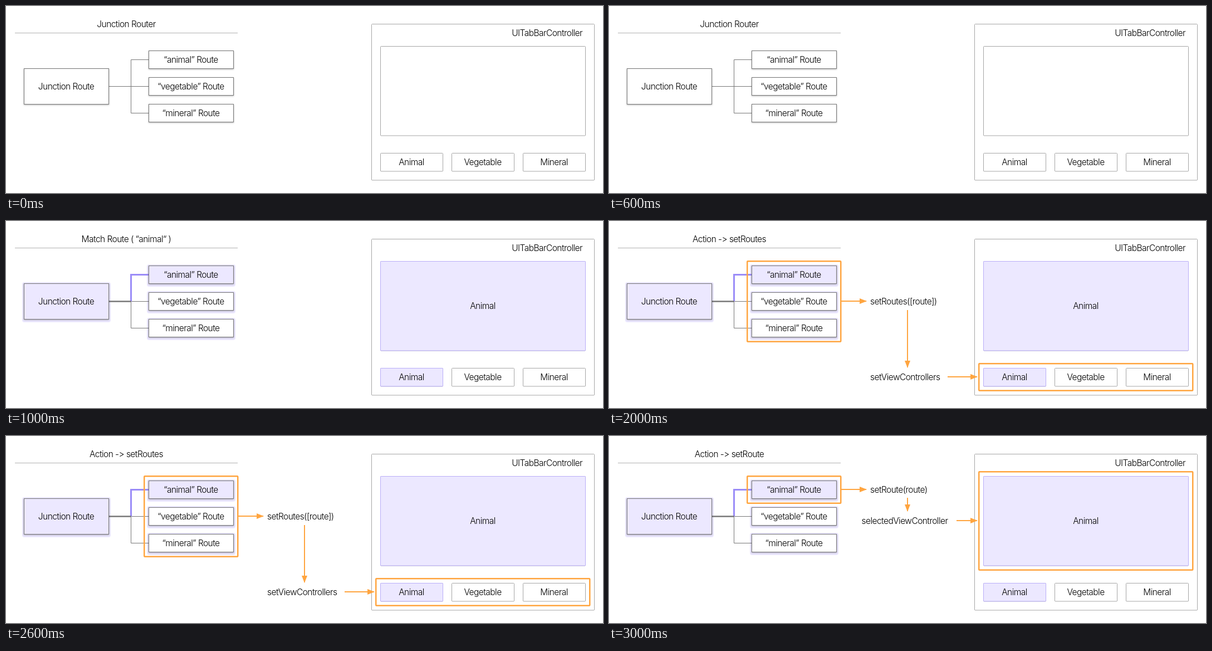
Write an HTML page that moves like this. It is 1072x336 px and loops after 4000 ms.

```html
<!DOCTYPE html>
<html lang="en">
<head>
<meta charset="utf-8">
<title>Tab routing</title>
<style>
  html, body { margin: 0; width: 100%; height: 100%; overflow: hidden; background: #fff; }
  svg { display: block; width: 1072px; height: 336px; }
  text { font: 300 15.5px Inter, Roboto, sans-serif; letter-spacing: -.55px; fill: #000; }
  .mid { text-anchor: middle; }
  .end { text-anchor: end; }
  .line { fill: none; stroke: #777; }
  .rule { fill: none; stroke: #b0b0b0; }
  .node { fill: #fff; stroke: #777; }
  .view { fill: #fff; stroke: #a6a6a6; }
  .halo { fill: #ece8ff; }
  .on { fill: #ece8ff; }
  .view.on { stroke: #b9aef8; }
  .path { fill: none; stroke: #9b8cf8; stroke-width: 3; }
  .mark { fill: none; stroke: #ffa540; stroke-width: 2.5; stroke-linejoin: round; }
  .arrow { fill: none; stroke: #ffa540; stroke-width: 2; marker-end: url(#head); }
  .shadow { filter: drop-shadow(0 1.5px 1.5px rgba(0, 0, 0, .3)); }

  .idle, .match, .routes, .route, .lit { animation: 4s step-end infinite; }
  .idle { animation-name: idle; }
  .match { animation-name: match; }
  .routes { animation-name: routes; }
  .route { animation-name: route; }
  .lit { animation-name: lit; }
  @keyframes idle { 0% { opacity: 1 } 25%, 100% { opacity: 0 } }
  @keyframes match { 0% { opacity: 0 } 25% { opacity: 1 } 50%, 100% { opacity: 0 } }
  @keyframes routes { 0% { opacity: 0 } 50% { opacity: 1 } 75%, 100% { opacity: 0 } }
  @keyframes route { 0% { opacity: 0 } 75%, 100% { opacity: 1 } }
  @keyframes lit { 0% { opacity: 0 } 25%, 100% { opacity: 1 } }
</style>
</head>
<body>
<svg viewBox="0 0 1072 336">
  <defs>
    <marker id="head" markerUnits="userSpaceOnUse" markerWidth="13" markerHeight="10" refX="12" refY="5" orient="auto">
      <path d="M0 0L13 5L0 10Z" fill="#ffa540"/>
    </marker>
  </defs>

  <!-- titles -->
  <path class="rule" d="M16 48.5H416"/>
  <text class="mid idle" x="216" y="38">Junction Router</text>
  <text class="mid match" x="216" y="38">Match Route ( “animal“ )</text>
  <text class="mid routes" x="216" y="38">Action -&gt; setRoutes</text>
  <text class="mid route" x="216" y="38">Action -&gt; setRoute</text>

  <!-- route tree -->
  <g class="halo lit">
    <rect x="29" y="110" width="159" height="72" rx="4"/>
    <rect x="253" y="78" width="159" height="40" rx="4"/>
    <rect x="253" y="126" width="159" height="40" rx="4"/>
    <rect x="253" y="174" width="159" height="40" rx="4"/>
  </g>
  <path class="line" d="M185 144.5H256M256 96.5H224.5V192.5H256"/>
  <g class="lit">
    <path class="path" d="M224.5 145V96.5H256"/>
    <path class="line" stroke-width="2.5" d="M185 144.5H225"/>
  </g>
  <g class="shadow">
    <rect class="node" x="32.5" y="112.5" width="152" height="64"/>
    <rect class="node" x="256.5" y="80.5" width="152" height="32"/>
    <rect class="node" x="256.5" y="128.5" width="152" height="32"/>
    <rect class="node" x="256.5" y="176.5" width="152" height="32"/>
  </g>
  <g class="lit">
    <rect class="node on" x="32.5" y="112.5" width="152" height="64"/>
    <rect class="node on" x="256.5" y="80.5" width="152" height="32"/>
  </g>
  <g class="mid">
    <text x="108" y="150">Junction Route</text>
    <text x="332" y="102">“animal” Route</text>
    <text x="332" y="150">“vegetable” Route</text>
    <text x="332" y="198">“mineral” Route</text>
  </g>

  <!-- tab bar controller -->
  <rect class="view" x="656.5" y="32.5" width="400" height="280.5" rx="1"/>
  <text class="end" x="1035" y="54">UITabBarController</text>
  <rect class="view" x="672.5" y="72.5" width="368" height="160.5" rx="1"/>
  <rect class="view" x="672.5" y="264.5" width="112" height="32.5" rx="1"/>
  <rect class="view" x="800.5" y="264.5" width="112" height="32.5" rx="1"/>
  <rect class="view" x="928.5" y="264.5" width="112" height="32.5" rx="1"/>
  <g class="lit">
    <rect class="view on" x="672.5" y="72.5" width="368" height="160.5" rx="1"/>
    <rect class="view on" x="672.5" y="264.5" width="112" height="32.5" rx="1"/>
    <text class="mid" x="856" y="158">Animal</text>
  </g>
  <g class="mid">
    <text x="728" y="286">Animal</text>
    <text x="856" y="286">Vegetable</text>
    <text x="984" y="286">Mineral</text>
  </g>

  <!-- set all routes -->
  <g class="routes">
    <rect class="mark" x="248.25" y="72.25" width="168" height="144.5" rx="1"/>
    <rect class="mark" x="664.25" y="256.25" width="384" height="48.5" rx="1"/>
    <path class="arrow" d="M416 144H462"/>
    <path class="arrow" d="M536 160V263"/>
    <path class="arrow" d="M608 280H661"/>
    <text x="469" y="150">setRoutes([route])</text>
    <text x="469" y="286">setViewControllers</text>
  </g>

  <!-- set one route -->
  <g class="route">
    <rect class="mark" x="248.25" y="72.25" width="168" height="48.5" rx="1"/>
    <rect class="mark" x="664.25" y="64.25" width="384" height="176.5" rx="1"/>
    <path class="arrow" d="M416 96H462"/>
    <path class="arrow" d="M536 111V135"/>
    <path class="arrow" d="M624 152H661"/>
    <text x="469" y="102">setRoute(route)</text>
    <text class="mid" x="531" y="158">selectedViewController</text>
  </g>
</svg>
</body>
</html>
```
